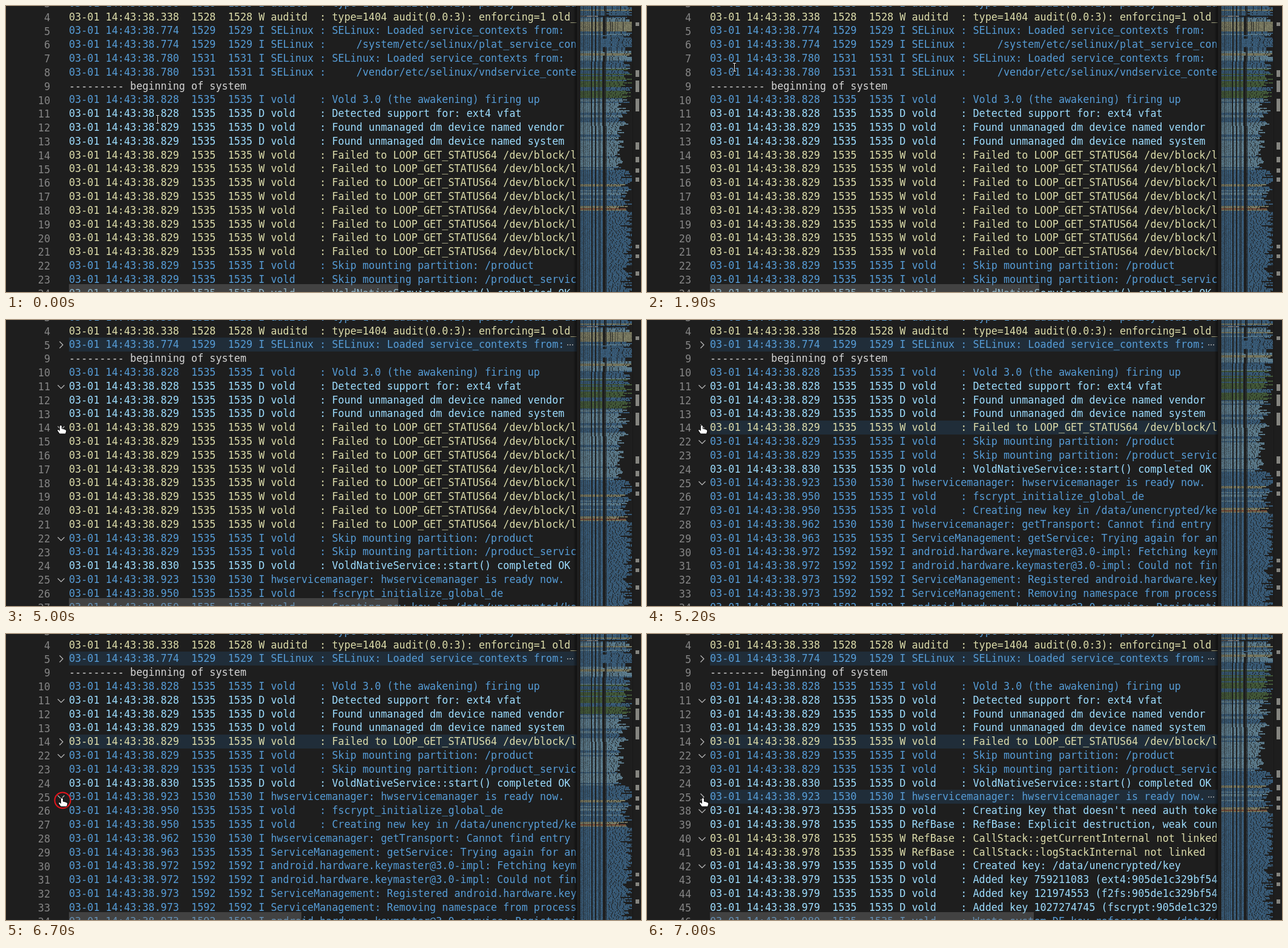
An HTML page with a canvas for the animation above (8 s loop, 1049 by 472 pixels).

```html
<!DOCTYPE html>
<html lang="en">
<head>
<meta charset="utf-8">
<title>Log folding</title>
<style>
html, body { margin: 0; width: 100%; height: 100%; overflow: hidden; background: #1e1e1e; }
canvas { display: block; }
</style>
</head>
<body>
<canvas id="stage" width="1049" height="472"></canvas>
<script>
const ctx = document.getElementById('stage').getContext('2d');
const FONT = '16.8px "DejaVu Sans Mono", monospace';
const ROW = 22.8, TEXT_X = 104, EDITOR_RIGHT = 943, MAP_X = 949;
const COLORS = { I: '#569cd6', D: '#9cdcfe', W: '#dcdcaa', V: '#6a9955', E: '#ce7350', '-': '#d4d4d4' };

const loopFailure = '38.829 1535 W vold|Failed to LOOP_GET_STATUS64 /dev/block/loop: No such device';
const log = [
  '38.320 1528 I auditd|type=2000 audit(0.0:1): initialized',
  '38.330 1528 I auditd|type=1403 audit(0.0:2): policy loaded auid=4294967295',
  '38.338 1528 I auditd|type=1403 audit(0.0:2): policy loaded auid=4294967295',
  '38.338 1528 W auditd|type=1404 audit(0.0:3): enforcing=1 old_enforcing=0',
  '38.774 1529 I SELinux|SELinux: Loaded service_contexts from:',
  '38.774 1529 I SELinux|    /system/etc/selinux/plat_service_contexts',
  '38.780 1531 I SELinux|SELinux: Loaded service_contexts from:',
  '38.780 1531 I SELinux|    /vendor/etc/selinux/vndservice_contexts',
  '--------- beginning of system',
  '38.828 1535 I vold|Vold 3.0 (the awakening) firing up',
  '38.828 1535 D vold|Detected support for: ext4 vfat',
  '38.829 1535 D vold|Found unmanaged dm device named vendor',
  '38.829 1535 D vold|Found unmanaged dm device named system',
  ...Array(8).fill(loopFailure),
  '38.829 1535 I vold|Skip mounting partition: /product',
  '38.829 1535 I vold|Skip mounting partition: /product_services',
  '38.830 1535 D vold|VoldNativeService::start() completed OK',
  '38.923 1530 I hwservicemanager|hwservicemanager is ready now.',
  '38.950 1535 I vold|fscrypt_initialize_global_de',
  '38.950 1535 I vold|Creating new key in /data/unencrypted/key',
  '38.962 1530 I hwservicemanager|getTransport: Cannot find entry in manifest',
  '38.963 1535 I ServiceManagement|getService: Trying again for android.hardware',
  '38.972 1592 I android.hardware.keymaster@3.0-impl|Fetching keymaster device',
  '38.972 1592 I android.hardware.keymaster@3.0-impl|Could not find any device',
  '38.973 1592 I ServiceManagement|Registered android.hardware.keymaster@3.0',
  '38.973 1592 I ServiceManagement|Removing namespace from process name',
  '38.973 1592 I android.hardware.keymaster@3.0-service|Registration complete',
  ...Array(3).fill('38.973 1535 I vold|List of keymaster devices found'),
  "38.973 1535 D vold|Creating key that doesn't need auth token",
  '38.978 1535 D RefBase|RefBase: Explicit destruction, weak count = 0',
  '38.978 1535 W RefBase|CallStack::getCurrentInternal not linked, returning null',
  '38.978 1535 W RefBase|CallStack::logStackInternal not linked',
  '38.979 1535 D vold|Created key: /data/unencrypted/key',
  '38.979 1535 D vold|Added key 759211083 (ext4:905de1c329bf5466)',
  '38.979 1535 D vold|Added key 121974553 (f2fs:905de1c329bf5466)',
  '38.979 1535 D vold|Added key 1027274745 (fscrypt:905de1c329bf5466)',
  '38.980 1535 I vold|Wrote system DE key reference to /data/unencrypted/ref'
];

function parse(entry, index) {
  const number = index + 1;
  if (entry[0] === '-') return { number, level: '-', text: entry };
  const [head, message] = entry.split('|');
  const [time, pid, level, tag] = head.split(' ');
  return { number, level, text: `03-01 14:43:${time}  ${pid}  ${pid} ${level} ${tag.padEnd(8)}: ${message}` };
}
const lines = log.map(parse);

function noise(seed) {
  const v = Math.sin(seed * 12.9898) * 43758.5453;
  return v - Math.floor(v);
}

// Lines far below the view, seen only in the minimap: [last line, levels, message length]
const BANDS = [[52, 'IID', 40], [76, 'VIVI', 42], [100, 'DDI', 34], [135, 'DDID', 24],
  [146, 'II', 40], [152, 'IWI', 40], [165, 'IID', 38], [170, 'IEW', 36], [260, 'I', 46]];
for (let n = lines.length + 1; n <= 260; n++) {
  const [, levels, length] = BANDS.find(b => n <= b[0]);
  const level = levels[Math.floor(noise(n) * levels.length)];
  let message = '';
  while (message.length < length * (0.5 + noise(n + 300) / 2)) {
    message += 'x'.repeat(3 + 8 * noise(n * 7 + message.length)) + ' ';
  }
  lines.push({ number: n, level, text: `03-01 14:43:39.${n}  1535  1535 ${level} vold    : ${message}` });
}

const FOLDS = [{ at: 5000, head: 5, last: 8 }, { at: 5200, head: 14, last: 21 }, { at: 6900, head: 25, last: 37 }];
const FOLDABLE = [5, 11, 14, 22, 25, 38, 40, 42];
const RULER_MARKS = [[27, 6], [106, 11], [123, 19], [153, 21], [225, 12], [249, 9], [268, 7], [283, 7], [394, 6], [410, 6], [438, 7]];

function polyline(points, color, width = 1) {
  ctx.beginPath();
  points.forEach(([x, y]) => ctx.lineTo(x, y));
  ctx.strokeStyle = color;
  ctx.lineWidth = width;
  ctx.stroke();
}

function chevron(y, folded) {
  polyline(folded ? [[88.5, y - 5.5], [94, y], [88.5, y + 5.5]] : [[85.5, y - 2.5], [91, y + 3], [96.5, y - 2.5]], '#c5c5c5', 1.1);
}

function drawEditor(t, visible, folds) {
  ctx.save();
  ctx.beginPath();
  ctx.rect(0, 0, EDITOR_RIGHT, 472);
  ctx.clip();
  ctx.font = FONT;
  visible.slice(2, 24).forEach((line, i) => {
    const offset = ROW * (i - 1);
    const middle = Math.floor(18 + offset + 0.001);
    const folded = folds.some(f => f.head === line.number);
    if (folded) {
      ctx.fillStyle = '#202d39';
      ctx.fillRect(TEXT_X, middle - 11, EDITOR_RIGHT - TEXT_X, 23);
    }
    ctx.textAlign = 'right';
    ctx.fillStyle = '#858585';
    ctx.fillText(line.number, 73, Math.floor(19.2 + offset + 0.001) + 6);
    ctx.textAlign = 'left';
    ctx.fillStyle = COLORS[line.level];
    ctx.fillText(line.text, TEXT_X, middle + 6);
    if (folded && line.number !== 14) {
      ctx.fillStyle = '#8a8d90';
      for (const x of [927, 931, 935]) ctx.fillRect(x, middle, 2, 2);
    }
    if (FOLDABLE.includes(line.number) && t >= 2200) {
      ctx.globalAlpha = Math.min(1, (t - 2100) / 300);
      chevron(middle + 1, folded);
      ctx.globalAlpha = 1;
    }
  });

  const barWidth = t < 5200 ? 544 : t < 5300 ? 0 : t < 6900 ? 384 : t < 7000 ? 0 : 535;
  ctx.fillStyle = 'rgba(121,121,121,.4)';
  ctx.fillRect(TEXT_X, 459, barWidth, 13);
  const shadow = ctx.createLinearGradient(937, 0, EDITOR_RIGHT, 0);
  shadow.addColorStop(0, 'rgba(0,0,0,0)');
  shadow.addColorStop(1, 'rgba(0,0,0,.5)');
  ctx.fillStyle = shadow;
  ctx.fillRect(937, 0, 6, 472);
  ctx.restore();
}

const minimaps = {};
function minimap(visible, key) {
  if (minimaps[key]) return minimaps[key];
  const map = document.createElement('canvas');
  map.width = 85;
  map.height = 472;
  const pen = map.getContext('2d');
  visible.slice(0, 236).forEach((line, row) => {
    pen.fillStyle = COLORS[line.level];
    [...line.text.slice(0, 85)].forEach((char, x) => {
      if (char === ' ') return;
      const ink = '.:-_'.includes(char) ? 0.2 : 0.42;
      for (let half = 0; half < 2; half++) {
        pen.globalAlpha = ink + 0.2 * noise(line.number * 91 + x * 2 + half) - 0.12 * half;
        pen.fillRect(x, row * 2 + half, 1, 1);
      }
    });
  });
  return minimaps[key] = map;
}

function drawRuler() {
  ctx.fillStyle = '#181818';
  ctx.fillRect(1035, 0, 1, 472);
  ctx.fillStyle = '#858580';
  for (const [y, height] of RULER_MARKS) ctx.fillRect(1040, y, 6, height);
}

function shape(path, x, y) {
  ctx.save();
  ctx.translate(x, y);
  const outline = new Path2D(path);
  ctx.lineJoin = 'round';
  ctx.strokeStyle = '#000';
  ctx.lineWidth = 1.6;
  ctx.stroke(outline);
  ctx.fillStyle = '#fff';
  ctx.fill(outline);
  ctx.restore();
}
const ARROW = 'M0 0V15L3.4 11.8L5.8 17.3L8.2 16.2L5.8 11H10.4Z';
const HAND = 'M-2.6 -6Q-1 -8 .4 -6V-1.5L2.4 -1L4.6 -.4L6.8 .4Q8 1 7.8 2.4L6.6 6.6H-2.8L-6.4 1.6Q-6.4 -.2 -4.4 .6L-2.6 2.2Z';

function beam(x, y) {
  const strokes = [[[x, y - 6], [x, y + 6]], [[x - 2.5, y - 6.5], [x + 2.5, y - 6.5]], [[x - 2.5, y + 6.5], [x + 2.5, y + 6.5]]];
  strokes.forEach(s => polyline(s, '#111', 3));
  strokes.forEach(s => polyline(s, '#eee', 1));
}

function drawPointer(t) {
  if (t < 1300) return beam(250.5, 187);
  if (t < 2200) {
    const p = (t - 1300) / 800;
    return beam(Math.round(219 - 100 * p) + 0.5, Math.round(180 - 105 * p));
  }
  if (t < 5000) {
    const step = Math.min(2, (t - 2200) / 100);
    return shape(ARROW, [104, 92, 83.5][step], [76, 74, 73][step]);
  }
  const p = Math.max(0, Math.min(1, (t - 5800) / 600));
  const x = 91.5 + 2 * p, y = 181 + 97 * p;
  if (t >= 6700 && t < 6800) {
    ctx.beginPath();
    ctx.arc(93.5, 274.5, 13, 0, 7);
    ctx.strokeStyle = '#e8141c';
    ctx.lineWidth = 2;
    ctx.stroke();
  }
  shape(HAND, x, y);
}

function draw(now) {
  const t = Math.floor((now % 8000) / 100) * 100;
  const folds = FOLDS.filter(f => t >= f.at);
  const visible = lines.filter(l => !folds.some(f => l.number > f.head && l.number <= f.last));
  ctx.fillStyle = '#1e1e1e';
  ctx.fillRect(0, 0, 1049, 472);
  drawEditor(t, visible, folds);
  ctx.drawImage(minimap(visible, folds.length), MAP_X, 0);
  drawRuler();
  drawPointer(t);
}

const start = performance.now();
function tick() {
  draw(performance.now() - start);
  requestAnimationFrame(tick);
}
tick();
</script>
</body>
</html>
```
